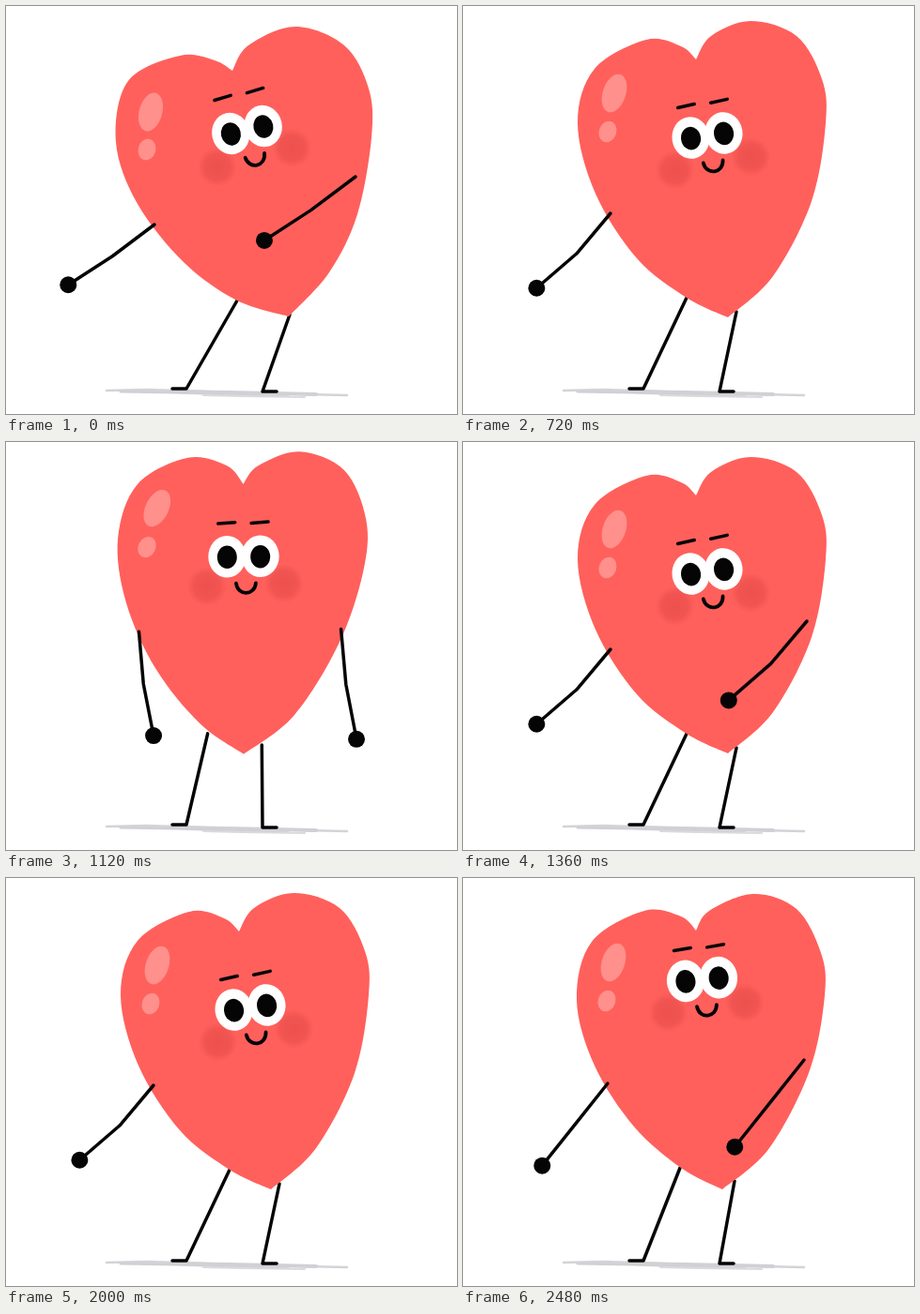
An HTML page with a canvas that plays this animation: 480x435 px, repeating every 2.56 s.

```html
<!DOCTYPE html>
<html lang="en">
<head>
<meta charset="utf-8">
<title>Dancing heart</title>
<style>
html, body { margin: 0; overflow: hidden; background: #fff; }
canvas { display: block; }
</style>
</head>
<body>
<canvas id="stage" width="480" height="435"></canvas>
<script>
const ctx = document.getElementById('stage').getContext('2d');
const STEP = 80, STEPS = 32, GROUND = 332;
const INK = '#050505', RED = '#ff605c', SHINE = '#ff908b';

// right, left: outline from notch to tip and back up.
// face: x, y, tilt, brow height.  arms: two shoulders, angle, bend.
// shine: big spot, tilt, small spot.
const leanRight = {
  right: [241,69, 258,42, 308,22, 360,42, 386,88, 389,140, 374,222, 344,284, 301,331],
  left: [301,331, 246,314, 190,274, 140,211, 117,145, 130,80, 185,53, 222,58, 241,69],
  face: [256.5, 132, -12.9, -39],
  arms: [158,233, 372,182, 145, -2],
  hips: [246,314, 302,329],
  shine: [154,113, 15, 150,153],
};
const settle = {
  right: [248,57, 264,32, 306,16, 355,32, 382,78, 386,125, 371,208, 330,288, 282,332],
  left: [282,332, 238,311, 185,269, 141,200, 122,125, 140,67, 195,36, 232,43, 248,57],
  face: [260, 138, -8.5, -34.5],
  arms: [157,221, 366,191, 134.6, -4.5],
  hips: [238,311, 291,326],
  shine: [161,93, 18, 154,134],
};
const approach = {
  right: [248,56, 262,35, 309,17, 355,33, 381,80, 385,125, 369,205, 326,288, 276,332],
  left: [276,332, 232,309, 182,265, 140,200, 121,130, 137,68, 193,35, 232,41, 248,56],
  face: [254.5, 108, -6, -34],
  arms: [154,219, 363,194, 128.5, 0],
  hips: [231,309, 289,323],
  shine: [160,90, 18, 153,131],
};
const leanLeft = {
  right: [260,69, 279,55, 318,47, 368,70, 387,125, 372,190, 330,249, 275,303, 215,334],
  left: [215,334, 165,291, 123,218, 108,148, 116,92, 145,50, 195,34, 240,45, 260,69],
  face: [250.5, 134, 7.5, -39],
  arms: [121,194, 346,228, 36.7, 2],
  hips: [188,314, 245,323],
  shine: [162,78, 38, 145,114],
};

// Blend towards the left lean, stretched upwards from the ground.
function between(from, k, stretch, faceY, angle, bend) {
  const pose = {};
  for (const key in from) pose[key] = from[key].map((v, i) => v + (leanLeft[key][i] - v) * k);
  const lift = (list, ...at) => at.forEach(i => list[i] = GROUND + (list[i] - GROUND) * stretch);
  const odd = [1, 3, 5, 7, 9, 11, 13, 15, 17];
  lift(pose.right, ...odd);
  lift(pose.left, ...odd);
  lift(pose.arms, 1, 3);
  lift(pose.shine, 1, 4);
  pose.face[1] = faceY;
  pose.arms[4] = angle;
  pose.arms[5] = bend;
  return pose;
}

const poses = [
  leanRight,
  settle,
  between(settle, .35, 1.055, 122, 96, -3),
  between(settle, .65, 1.04, 109, 52.5, 0),
  leanLeft,
  between(approach, .7, 1.045, 138, 46, 4.5),
  between(approach, .38, 1.06, 122, 82, 3),
  approach,
];

function spline(p) {
  const n = p.length / 2;
  const at = i => { i = Math.max(0, Math.min(n - 1, i)); return [p[2 * i], p[2 * i + 1]]; };
  for (let i = 0; i < n - 1; i++) {
    const [a, b, c, d] = [at(i - 1), at(i), at(i + 1), at(i + 2)];
    ctx.bezierCurveTo(b[0] + (c[0] - a[0]) / 6, b[1] + (c[1] - a[1]) / 6,
      c[0] - (d[0] - b[0]) / 6, c[1] - (d[1] - b[1]) / 6, c[0], c[1]);
  }
}

function line(points, width = 3.5, color = INK) {
  ctx.beginPath();
  for (let i = 0; i < points.length; i += 2) ctx.lineTo(points[i], points[i + 1]);
  ctx.lineWidth = width;
  ctx.strokeStyle = color;
  ctx.stroke();
}

function oval(x, y, rx, ry, color, tilt = 0) {
  ctx.beginPath();
  ctx.ellipse(x, y, rx, ry, tilt * Math.PI / 180, 0, 2 * Math.PI);
  ctx.fillStyle = color;
  ctx.fill();
}

function drawShadow() {
  line([107,410, 150,409, 210,411, 270,413, 363,415], 2.5, '#d3d3d8');
  line([122,411, 180,412, 240,414, 300,415], 3, '#d0d0d5');
  line([180,411, 235,412, 285,413, 330,414], 4, '#d0d0d5');
  line([210,415, 250,416, 318,417], 2, '#dadade');
}

function drawCheek(x, y) {
  const glow = ctx.createRadialGradient(x, y, 0, x, y, 21);
  glow.addColorStop(0, 'rgba(236,80,76,.95)');
  glow.addColorStop(.65, 'rgba(238,82,78,.8)');
  glow.addColorStop(1, 'rgba(238,82,78,0)');
  oval(x, y, 21, 21, glow);
}

function drawFace([x, y, tilt, brow]) {
  ctx.save();
  ctx.translate(x, y);
  ctx.rotate(tilt * Math.PI / 180);
  drawCheek(-39.5, 31.5);
  drawCheek(42.5, 29.5);
  for (const side of [-17.7, 17.7]) oval(side, 0, 20, 22.3, '#fff');
  for (const side of [-17.7, 17.7]) {
    oval(side, .5, 10.5, 12.3, INK);
    line([side - 9, brow + .6, side + 9, brow - .6]);
  }
  ctx.beginPath();
  ctx.moveTo(-8.5, 28.5);
  ctx.bezierCurveTo(-7, 42.5, 11, 42.5, 12.5, 28.5);
  ctx.lineWidth = 3.8;
  ctx.stroke();
  ctx.restore();
}

function drawArm(x, y, length, angle, bend) {
  const c = Math.cos(angle * Math.PI / 180), s = Math.sin(angle * Math.PI / 180);
  const handX = x + length * c, handY = y + length * s;
  line([x, y, x + length / 2 * c - bend * s, y + length / 2 * s + bend * c, handX, handY]);
  oval(handX, handY, 9, 9, INK);
}

function draw(step) {
  const { right, left, face, arms, hips, shine } = poses[step % 8];
  ctx.clearRect(0, 0, 480, 435);
  ctx.lineCap = ctx.lineJoin = 'round';
  drawShadow();
  line([hips[0], hips[1], 192, 408, 177, 408]);
  line([hips[2], hips[3], 273, 411, 288, 411]);

  ctx.beginPath();
  ctx.moveTo(right[0], right[1]);
  spline(right);
  spline(left);
  ctx.fillStyle = RED;
  ctx.fill();

  oval(shine[0], shine[1], 12.3, 21, SHINE, shine[2]);
  oval(shine[3], shine[4], 9.3, 11.5, SHINE, shine[2]);
  drawFace(face);
  drawArm(arms[0], arms[1], 112, arms[4], arms[5]);
  // The near arm drops out on every second settle.
  if (step % 16 !== 9) drawArm(arms[2], arms[3], 118.5, arms[4], arms[5]);
}

const start = performance.now();
function tick() {
  draw(Math.floor((performance.now() - start) / STEP) % STEPS);
  requestAnimationFrame(tick);
}
tick();
</script>
</body>
</html>
```
